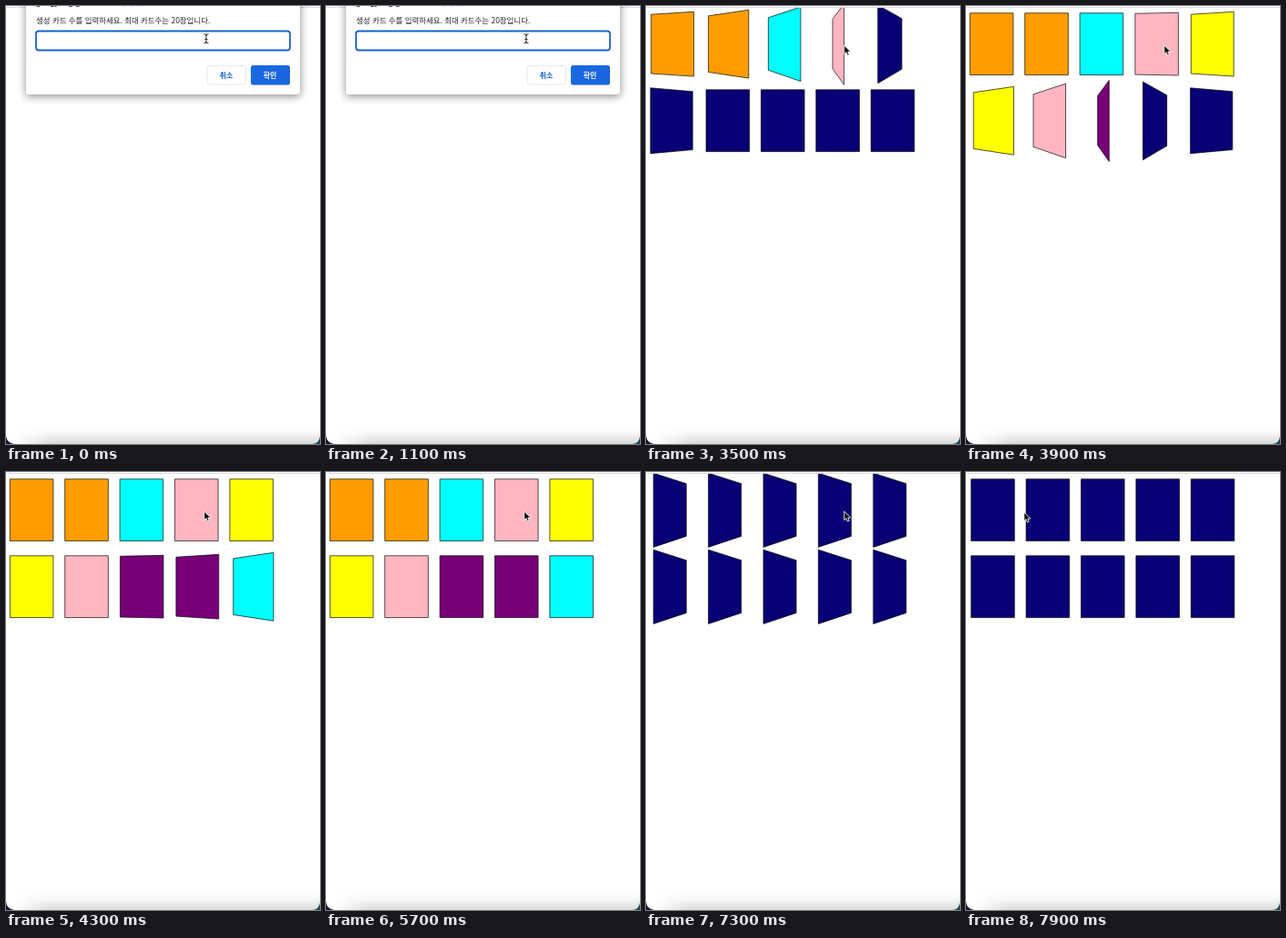
Animation of 345x480 px, one loop 8000 ms. Source, as an HTML page:

```html
<!DOCTYPE html>
<html lang="ko">
<head>
<meta charset="utf-8">
<style>
  html, body { margin: 0; width: 100%; height: 100%; overflow: hidden; background: #fff; }
  svg { display: block; width: 345px; height: 480px; }
  text { font-family: "Noto Sans CJK KR", "Noto Sans CJK", "Noto Sans", sans-serif; font-size: 8.45px; fill: #202124; }
  .button { font-size: 8px; font-weight: bold; text-anchor: middle; }
  #dialog > rect:first-child { filter: drop-shadow(0 2px 5px #0007); }
</style>
</head>
<body>
<svg viewBox="0 0 345 480">
  <defs>
    <linearGradient id="shade" x2="0" y2="1">
      <stop offset="0" stop-color="#000" stop-opacity="0"/>
      <stop offset=".5" stop-color="#000" stop-opacity=".03"/>
      <stop offset="1" stop-color="#000" stop-opacity=".15"/>
    </linearGradient>
    <linearGradient id="fade">
      <stop offset=".15" stop-color="#fff"/>
      <stop offset="1" stop-color="#fff" stop-opacity="0"/>
    </linearGradient>
  </defs>
  <rect width="345" height="480" fill="#fff"/>
  <rect y="456" width="345" height="24" fill="url(#shade)"/>
  <rect y="456" width="50" height="24" fill="url(#fade)"/>
  <path d="M0 471Q1 479 9 480H0Z" fill="#15123c"/>
  <path d="M345 472Q344 479 337 480H345Z" fill="#17465c"/>
  <g id="cards" stroke="#000" stroke-width=".67"></g>
  <rect width="345" height="1" fill="#fff"/>
  <rect y="1" width="345" height="1" fill="#dcdcdc"/>
  <g id="dialog">
    <rect x="22" y="-20" width="301" height="117" rx="3" fill="#fff"/>
    <text x="33" y="-1" font-weight="bold">gangyang.github.io 페이지 내용:</text>
    <text x="33" y="18.7">생성 카드 수를 입력하세요. 최대 카드수는 20장입니다.</text>
    <rect x="33" y="27.5" width="279" height="21" rx="3" fill="#fff" stroke="#1a61cc" stroke-width="1.8"/>
    <text id="entry" x="38" y="41"></text>
    <rect id="caret" x="38" y="32" width="1" height="12" fill="#202124"/>
    <rect x="221" y="65.5" width="42.5" height="20.5" rx="2.5" fill="#fff" stroke="#e4e7ec"/>
    <text class="button" x="242" y="78.5" style="fill:#1a66e0">취소</text>
    <rect x="269" y="65" width="43" height="21.5" rx="2.5" fill="#1a66e0"/>
    <text class="button" x="290" y="78.5" style="fill:#fff">확인</text>
  </g>
  <path id="beam" d="M217.500 30.500Q220 30.500 220 32.500Q220 30.500 222.500 30.500M220 32V40M217.500 41Q220 41 220 39Q220 41 222.500 41M218.500 36.500H221.500" fill="none" stroke="#222"/>
  <path id="arrow" d="M0 0V9.500L2.200 7.500L3.700 11L5.500 10.200L4 6.900H7Z" fill="#000" stroke="#fff" stroke-width=".9"/>
</svg>
<script>
const LOOP = 8000, FLIP = 800;
const CLOSE = 1900, OPEN_CARDS = 2932, HIDE_CARDS = 6928;
// The page is shown zoomed out: a 70 x 100 card with a perspective of 140
const ZOOM = .671, PERSPECTIVE = 140 * ZOOM;
const LEFT = -34.5 * ZOOM, RIGHT = 36.5 * ZOOM, TOP = -49.5 * ZOOM, BOTTOM = 51.5 * ZOOM;
const COLORS = ['#ff9d00', '#ff9d00', '#00fdff', '#ffb6c1', '#ff0', '#ff0', '#ffb6c1', '#770077', '#770077', '#00fdff'];
const BACK = '#080074';
const $ = id => document.getElementById(id);

const clamp = v => Math.min(1, Math.max(0, v));
const progress = (t, start, length) => clamp((t - start) / length);
const smooth = p => p * p * (3 - 2 * p);

// cubic-bezier(.25, .1, .25, 1)
function ease(x) {
  const curve = (a, b, u) => 3 * (1 - u) * u * ((1 - u) * a + u * b) + u ** 3;
  let low = 0, high = 1;
  for (let i = 0; i < 20; i++) {
    const mid = (low + high) / 2;
    if (curve(.25, .25, mid) < x) low = mid; else high = mid;
  }
  return curve(.1, 1, high);
}

const cards = COLORS.map(() =>
  $('cards').appendChild(document.createElementNS('http://www.w3.org/2000/svg', 'polygon')));

function drawCard(card, i, t) {
  const turn = ease(progress(t, OPEN_CARDS + 100 * i, FLIP)) - ease(progress(t, HIDE_CARDS, FLIP));
  const angle = turn * Math.PI;
  const cx = 28.8 + 90 * ZOOM * (i % 5), cy = i < 5 ? 41 : 125;
  const corner = (x, y) => {
    const scale = PERSPECTIVE / (PERSPECTIVE + x * Math.sin(angle));
    return [cx + x * Math.cos(angle) * scale, cy + y * scale];
  };
  card.setAttribute('points', [corner(LEFT, TOP), corner(RIGHT, TOP), corner(RIGHT, BOTTOM), corner(LEFT, BOTTOM)].join(' '));
  card.setAttribute('fill', turn < .5 ? BACK : COLORS[i]);
}

function draw(t) {
  const entry = t < 1350 ? '' : t < 1550 ? '1' : '10';
  $('entry').textContent = entry;
  $('caret').setAttribute('x', 38 + 4.7 * entry.length);
  $('caret').style.opacity = entry || (t % 1000 >= 300 && t % 1000 < 800) ? 1 : 0;
  $('dialog').style.opacity = 1 - progress(t, CLOSE, 150);
  $('cards').style.opacity = t < CLOSE ? 0 : 1;
  cards.forEach((card, i) => drawCard(card, i, t));

  const down = smooth(progress(t, 2950, 200)), left = smooth(progress(t, 7300, 500));
  $('beam').style.opacity = t < 2000 ? 1 : 0;
  $('arrow').style.opacity = t < 2000 ? 0 : 1;
  $('arrow').setAttribute('transform', `translate(${217.8 - 154 * left} ${34.2 + 9 * down + left})`);
}

const begin = performance.now();
function tick() {
  draw((performance.now() - begin) % LOOP);
  requestAnimationFrame(tick);
}
tick();
</script>
</body>
</html>
```
